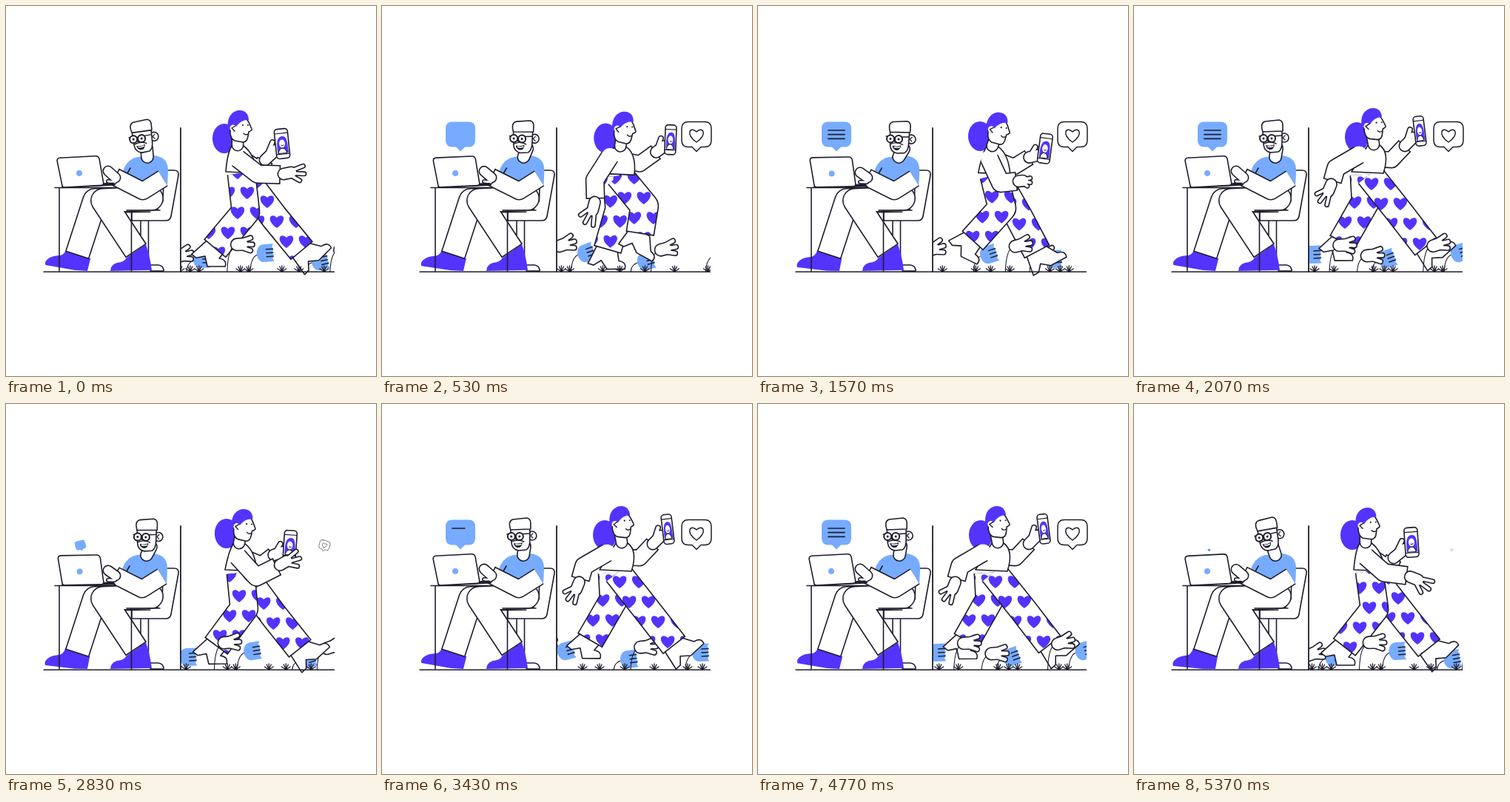
Write an HTML page with a canvas that moves like this. It is 500 by 500 pixels and loops after 5410 ms.

```html
<!DOCTYPE html>
<html lang="en">
<head>
<meta charset="utf-8">
<title>Chatting at a desk and on a walk</title>
<style>
  html, body { margin: 0; width: 100%; height: 100%; overflow: hidden; background: #fff; }
  canvas { display: block; width: 500px; height: 500px; }
</style>
</head>
<body>
<canvas id="stage"></canvas>
<script>
const INK = '#1f1d2c', VIOLET = '#5433ff', BLUE = '#77abff', WHITE = '#fff';
const LINE = 1.6, LOOP = 5410, CHAT = LOOP / 2, STRIDE = LOOP / 4, FIELD = 380;
const RAD = Math.PI / 180;

const canvas = document.getElementById('stage');
const ratio = Math.max(1, window.devicePixelRatio || 1);
canvas.width = canvas.height = 500 * ratio;
let c = canvas.getContext('2d');

// Poses of one stride; every list below has one entry per time.
const TIMES = [0, 130, 400, 720, 1070, 1313];

const body = {
  head:  [[315,166,0], [320,167,3], [328,171,10], [323,163,-4], [338,173,16], [315,165,-2]],
  bun:   [[295,179], [298,175], [303,179], [301,177], [308,177], [295,177]],
  neck:  [[313,191], [315,191], [320,194], [324,190], [321,196], [313,190]],
  waist: [[318,225], [317,225], [322,229], [315,225], [330,233], [318,225]]
};
const nearLeg = {
  hip:    [[318,226], [317,228], [322,230], [318,228], [327,238], [318,226]],
  knee:   [[324,278], [322,276], [348,268], [357,277], [334,285], [325,277]],
  ankle:  [[282,328], [284,327], [310,300], [395,326], [331,334], [284,329]],
  foot:   [[38,0], [38,0], [70,70], [-42,-42], [0,0], [38,0]],
  hearts: [[313,279], [302,286], [310,281], [321,294], [326,289], [318,275]]
};
const farLeg = {
  hip:    [[322,232], [322,232], [322,232], [311,228], [332,240], [322,232]],
  knee:   [[363,286], [361,285], [332,282], [313,264], [346,272], [364,286]],
  ankle:  [[400,331], [397,331], [331,334], [281,320], [312,300], [399,330]],
  foot:   [[-45,-45], [-42,-42], [0,0], [38,0], [70,70], [-45,-45]],
  hearts: [[366,291], [361,296], [335,290], [311,292], [351,285], [370,289]]
};
const arms = {
  shoulder: [[313,206], [313,206], [311,206], [304,201], [307,212], [313,206]],
  elbow:    [[340,227], [338,234], [304,246], [273,219], [301,246], [338,228]],
  wrist:    [[371,228], [366,220], [312,272], [268,237], [308,270], [369,232]],
  tip:      [[405,221], [396,203], [310,306], [255,269], [302,306], [404,246]],
  farElbow: [[344,222], [345,217], [348,218], [348,208], [346,226], [344,222]],
  farWrist: [[350,208], [362,204], [372,205], [366,189], [366,219], [351,208]],
  phone:    [[373,186,-6,18], [384,191,4,17], [392,192,10,16], [386,169,-7,14], [393,216,25,18], [375,187,-4,18]]
};
const man = {
  head:   [[184,178,-6], [190,179,2], [191,179,4], [187,178,0], [173,178,-2], [181,178,-8]],
  lean:   [[0], [-1], [0], [0], [-6], [0]],
  laptop: [[-3,-4], [-1,-2], [-2,-3], [-3,-4], [0,0], [-3,-3.5]],
  tap:    [[4], [1], [2], [4], [5], [0]]
};

// x, y, white petals, sway, stands in front of the walker
const flowers = [
  [262 - 11, 342, 0, 13, 0], [322, 322, 1, -3, 1], [350, 334, 0, 0, 0], [434, 345, 0, -10, 0],
  [458, 328, 1, 0, 0], [532, 336, 0, 0, 0], [575, 323, 1, 0, 1], [612, 337, 1, 5, 0]
];
const tufts = [249, 328, 373, 396, 430, 470, 515, 535, 561, 615, 641, 697];

const mod = (a, n) => ((a % n) + n) % n;
const ease = u => u * u * (3 - 2 * u);
const clamp = u => Math.min(1, Math.max(0, u));

// Smooth periodic curve through the poses.
function poseAt(keys, p) {
  const n = TIMES.length;
  let i = n - 1;
  while (TIMES[i] > p) i--;
  const time = j => TIMES[mod(j, n)] + Math.floor(j / n) * STRIDE;
  const span = time(i + 1) - time(i), u = (p - time(i)) / span;
  return keys[0].map((_, k) => {
    const val = j => keys[mod(j, n)][k];
    const slope = j => (val(j + 1) - val(j - 1)) / (time(j + 1) - time(j - 1)) * span;
    const a = val(i), b = val(i + 1), d = b - a;
    return a + u * (slope(i) + u * (3 * d - 2 * slope(i) - slope(i + 1)
      + u * (slope(i) + slope(i + 1) - 2 * d)));
  });
}
function poseOf(set, p) {
  const out = {};
  for (const name in set) out[name] = poseAt(set[name], p);
  return out;
}

function trace(pts, close) {
  c.beginPath();
  pts.forEach(([x, y], i) => i ? c.lineTo(x, y) : c.moveTo(x, y));
  if (close) c.closePath();
}
function ink(w = LINE) { c.strokeStyle = INK; c.lineWidth = w; c.stroke(); }
function paint(fill, outline = true) {
  c.fillStyle = fill;
  c.fill();
  if (outline) ink();
}
function draw(d, fill, w = LINE) {
  const path = new Path2D(d);
  if (fill) { c.fillStyle = fill; c.fill(path); }
  if (w) { c.strokeStyle = INK; c.lineWidth = w; c.stroke(path); }
}
function oval(x, y, rx, ry = rx) { c.beginPath(); c.ellipse(x, y, rx, ry, 0, 0, 7); }
function placed(x, y, deg, fn, s = 1) {
  c.save();
  c.translate(x, y);
  c.rotate(deg * RAD);
  c.scale(s, s);
  fn();
  c.restore();
}
function spin([x, y], deg) {
  const s = Math.sin(deg * RAD), k = Math.cos(deg * RAD);
  return [x * k - y * s, x * s + y * k];
}

// Outlined limb. start: 0 flat, 1 open, 2 rounded.
function tube(pts, w, fill = WHITE, start = 0) {
  const end = pts[pts.length - 1], prev = pts[pts.length - 2];
  const len = Math.hypot(end[0] - prev[0], end[1] - prev[1]) || 1;
  const inner = pts.slice(0, -1).concat([end.map((v, k) => v - (v - prev[k]) / len * LINE)]);
  c.lineCap = 'butt';
  [[pts, w, INK, start > 1], [inner, w - 2 * LINE, fill, start > 0]].forEach(([line, width, color, dot]) => {
    trace(line);
    c.strokeStyle = color;
    c.lineWidth = width;
    c.stroke();
    if (dot) { oval(...pts[0], width / 2); c.fillStyle = color; c.fill(); }
  });
  c.lineCap = 'round';
}
// Rounded strokes merged under one outline.
function blob(parts, fill = WHITE) {
  [[0, INK], [2 * LINE, fill]].forEach(([inset, color]) => parts.forEach(([a, b, w]) => {
    trace([a, b]);
    c.strokeStyle = color;
    c.lineWidth = w - inset;
    c.stroke();
  }));
}

function heart() {
  c.beginPath();
  c.moveTo(0, 9);
  c.bezierCurveTo(-16, -2, -8, -13, 0, -5);
  c.bezierCurveTo(8, -13, 16, -2, 0, 9);
  c.closePath();
}
const cloth = (() => {
  const tile = document.createElement('canvas'), main = c;
  tile.width = 52;
  tile.height = 108;
  c = tile.getContext('2d');
  c.scale(2, 2);
  c.fillStyle = WHITE;
  c.fillRect(0, 0, 26, 54);
  [[13, 13.5], [0, 40.5], [26, 40.5]].forEach(([x, y]) => placed(x, y, 0, () => {
    heart();
    paint(VIOLET, false);
  }));
  c = main;
  return c.createPattern(tile, 'repeat');
})();

function boot([x, y], [heel, toe]) {
  const at = (px, py) => { const q = spin([px, py], heel); return [x + q[0], y + q[1]]; };
  const ball = at(7, 25);
  const front = (px, py) => { const q = spin([px, py], toe); return [ball[0] + q[0], ball[1] + q[1]]; };
  trace([at(-15, -3), at(-20, 25), at(-12, 25), at(-4, 16), ball, front(24, 0)]);
  c.quadraticCurveTo(...front(27, -9), ...front(16, -11));
  c.lineTo(...at(13, -3));
  c.closePath();
  paint(WHITE);
}
function leg(l) {
  boot(l.ankle, l.foot);
  cloth.setTransform(new DOMMatrix().translate(l.hearts[0] - 13, l.hearts[1] - 13.5).scale(0.5));
  tube([l.hip, l.knee, l.ankle], 39, cloth);
}
function hand(wrist, tip) {
  const d = [tip[0] - wrist[0], tip[1] - wrist[1]];
  const at = (k, deg) => { const q = spin(d, deg); return [wrist[0] + q[0] * k, wrist[1] + q[1] * k]; };
  blob([[at(0.12, 0), at(0.42, 0), 17], [at(0.5, -9), at(0.94, -9), 7],
        [at(0.5, 6), at(0.92, 10), 7], [at(0.42, 18), at(0.78, 29), 7]]);
}

function drawPhone([x, y, deg, w]) {
  placed(x, y, deg, () => {
    c.beginPath();
    c.roundRect(-w / 2, -20, w, 40, 4);
    paint(WHITE);
    c.scale(w / 18, 1);
    draw('M-8.500-14H8.500M-8.500 14H8.500', null, 1.2);
    draw('M-7 13C-7 3-8-10 1-10C9-10 7 4 8 13Z', VIOLET, 0);
    oval(0, 0, 4, 5.5);
    paint(WHITE, false);
    draw('M-6 13Q-5 6 0 6Q5 7 5 13Z', WHITE, 1);
    draw('M-1 2Q0 3 2 2', null, 1);
  });
}

function walkerHead([x, y, deg]) {
  placed(x, y, deg, () => {
    draw('M-12-8L-12 6Q-11 14-6 16L5 18Q11 18 12 10L13 4Q18 2 17 0L13-9L6-20L-8-20Z', WHITE);
    draw('M-15-1C-17-17-8-25 1-25C9-25 13-19 13-12Q3-13-4-3L-8 4Z', VIOLET, 0);
    oval(-8, -1, 4.5);
    paint(WHITE, false);
    draw('M-5-4L-10-1L-6 3', null, 1.4);
    oval(5, -5, 1.1);
    paint(INK, false);
    oval(12, -5, 1);
    paint(INK, false);
    draw('M6 6Q8 9 12 7', null, 1.4);
  });
}

function walker(p) {
  const b = poseOf(body, p), a = poseOf(arms, p);
  const [nx, ny] = b.neck, [wx, wy] = b.waist;

  leg(poseOf(farLeg, p));
  leg(poseOf(nearLeg, p));
  oval(...b.bun, 16, 20);
  paint(VIOLET, false);

  const [px, py] = a.phone;
  tube([[nx + 9, ny + 17], a.farElbow, a.farWrist], 23);
  blob([[a.farWrist, [px - 9, py + 9], 17], [a.farWrist, [px - 13, py - 2], 8]]);
  drawPhone(a.phone);

  c.beginPath();
  c.moveTo(nx - 8, ny - 2);
  c.quadraticCurveTo(nx - 14, ny + 8, wx - 21, wy - 1);
  c.lineTo(wx + 22, wy + 1);
  c.quadraticCurveTo(nx + 22, ny + 8, nx + 8, ny - 2);
  c.closePath();
  paint(WHITE);
  tube([a.shoulder, a.elbow, a.wrist], 26, WHITE, 1);
  hand(a.wrist, a.tip);

  blob([[[b.head[0] - 2, b.head[1] + 8], [nx, ny - 3], 17]]);
  walkerHead(b.head);
}

function sitterHead([x, y, deg]) {
  placed(x, y, deg, () => {
    oval(16, 0, 6);
    paint(WHITE);
    draw('M17-3L14 0L17 3', null, 1.2);
    draw('M-13-9L-12 9Q-11 19-2 20L8 19Q13 16 13 6V-10Z', WHITE);
    draw('M-13-8Q-17-20-10-22L9-24Q14-23 14-17V-9Z', WHITE);
    draw('M-7-1Q-9 5-4 5M-11 8Q-4 4 5 8M-18-2H-16M-1-2L13-3', null, 1.4);
    [-12, -1].forEach(ex => {
      oval(ex, 1, 5);
      paint(WHITE, false);
      ink(2);
      oval(ex, 1, 1.5);
      paint(INK, false);
    });
    draw('M-9 10Q-3 12 3 9Q2 17-4 16Q-8 15-9 10Z', INK, 0);
    draw('M-7 12Q-3 13 1 11', null, 0);
    c.strokeStyle = WHITE;
    c.lineWidth = 1.6;
    c.stroke(new Path2D('M-6 12Q-3 13 1 11.500'));
  });
}

function sitter(p) {
  const m = poseOf(man, p), lean = m.lean[0];

  draw('M182 290V350M192.500 290V350', null);
  draw('M195 358V350H206Q213 351 213 358Z', WHITE);
  draw('M216 222H227Q234 222 233 229L223 284Q222 290 216 290H170V275H205Z', WHITE);

  placed(109, 358, m.tap[0], () =>
    draw('M-29-28L4-17L1 0H-16L-56-4Q-58-8-54-12Q-49-17-40-18Q-32-18-29-28Z', VIOLET, 0));
  tube([[195, 262], [120, 263], [96, 337]], 34);

  c.save();
  c.translate(lean, 0);
  draw('M164 232L213 238L212 264H168Z', WHITE);
  draw('M157 229Q160 208 178 204L200 202Q220 204 219 224L218 244L188 242L164 240Z', BLUE, 0);
  draw('M164 226L168 219', null);
  c.restore();

  draw('M163 340L189 322Q195 340 197 357L141 358Q141 350 150 347Q160 346 163 340Z', VIOLET, 0);
  tube([[196, 260], [131, 263], [176, 331]], 34, WHITE, 2);

  const [hx, hy] = m.head;
  blob([[[hx + 6, hy + 14], [191 + lean, 204], 18]]);
  sitterHead(m.head);

  const [tilt, lift] = m.laptop;
  tube([[212 + lean, 233], [185 + lean, 250], [147, 232 + lift / 3]], 25);
  blob([[[148, 232], [138, 227 + lift], 15], [[147, 238], [138, 239 + lift / 2], 6]]);

  placed(104, 246 + lift / 3, tilt, () => {
    draw('M-28-1H43L41-3H28Z', WHITE, 2);
    draw('M-29-41H19Q23-41 24-37L28-4Q28-1 25-1H-25Q-28-1-28-4L-33-37Q-33-41-29-41Z', WHITE);
    oval(-4, -19, 4);
    paint(BLUE, false);
  });
  draw('M66 245.500H147M72 246V358M169.500 277V358M163 276H208', null);
}

function flower([wx, y, pale, sway], p) {
  const x = mod(wx - FIELD * p / CHAT - 190, FIELD) + 190 + sway * Math.cos(2 * Math.PI * p / CHAT);
  const deg = -11 - 9 * Math.cos(2 * Math.PI * p / STRIDE + wx / 90);
  c.beginPath();
  c.moveTo(x - 20, 359);
  c.quadraticCurveTo(x - 19, y + 3, x - 7, y + 1);
  ink(1.1);
  placed(x, y, deg, () => {
    if (pale) {
      blob([[[-7, 0], [0, 0], 18], [[1, -5], [12, -8], 8], [[2, 0], [14, 1], 8], [[1, 5], [11, 9], 8]]);
    } else {
      draw('M12-12L-2-12C-14-11-14 11-2 12L12 12L10 8L12 4L10 0L12-4L10-8Z', BLUE, 0);
      draw('M2-5H11M2 0H11M2 5H11', null, 1.5);
    }
  });
}
function tuft(wx, p) {
  const x = mod(wx - FIELD * p / CHAT - 190, FIELD) + 190;
  placed(x, 359, 0, () => draw('M0 0L-6-4M0 0L-3-7M0 0V-8M0 0L3-7M0 0L6-4', null, 1.3));
}
function inField(fn) {
  c.save();
  c.beginPath();
  c.rect(236, 280, 208, 80);
  c.clip();
  fn();
  c.restore();
}

function bubbleScale(p) {
  const keys = [[0, 0], [70, 0], [130, 0.36], [340, 1.13], [500, 1], [2380, 1], [2490, 1.12], [2665, 0.09], [CHAT, 0]];
  const i = keys.findIndex(k => k[0] > p);
  const [t0, a] = keys[i - 1], [t1, b] = keys[i];
  return a + (b - a) * ease((p - t0) / (t1 - t0));
}
function bubbles(p) {
  const s = bubbleScale(p);
  if (s < 0.02) return;
  const turn = -25 * clamp(1 - s) * (p < CHAT / 2);
  const shape = 'M-11-40H11Q20-40 20-31V-15Q20-6 11-6H6L0 0L-6-6H-11Q-20-6-20-15V-31Q-20-40-11-40Z';
  placed(106 - 5 * clamp(1 - s), 196.5 + clamp(1 - s) * 3, turn, () => {
    draw(shape, BLUE, 0);
    for (let i = 0; i < 3; i++) {
      const grow = clamp((p - 600 - i * 180) / 165);
      if (grow) draw(`M-11 ${-28.5 + i * 5.7}h${22 * grow}`, null, 1.7);
    }
  }, s);
  placed(425 + 5 * clamp(1 - s), 196.5 + clamp(1 - s) * 3, -turn, () => {
    draw(shape, WHITE, 1.5);
    c.translate(0, -21.5);
    heart();
    ink(1.5);
  }, s);
}

function render(t) {
  const p = t % CHAT, step = t % STRIDE;
  c.setTransform(ratio, 0, 0, ratio, 0, 0);
  c.fillStyle = WHITE;
  c.fillRect(0, 0, 500, 500);
  c.lineCap = c.lineJoin = 'round';

  sitter(step);
  inField(() => flowers.filter(f => !f[4]).forEach(f => flower(f, p)));
  walker(step);
  inField(() => {
    flowers.filter(f => f[4]).forEach(f => flower(f, p));
    tufts.forEach(x => tuft(x, p));
  });
  draw('M51 359.300H443.500', null, 1.4);
  draw('M236 165V359', null, 1.8);
  bubbles(p);
}

const begin = performance.now();
function tick() {
  render((performance.now() - begin) % LOOP);
  requestAnimationFrame(tick);
}
tick();
</script>
</body>
</html>
```
